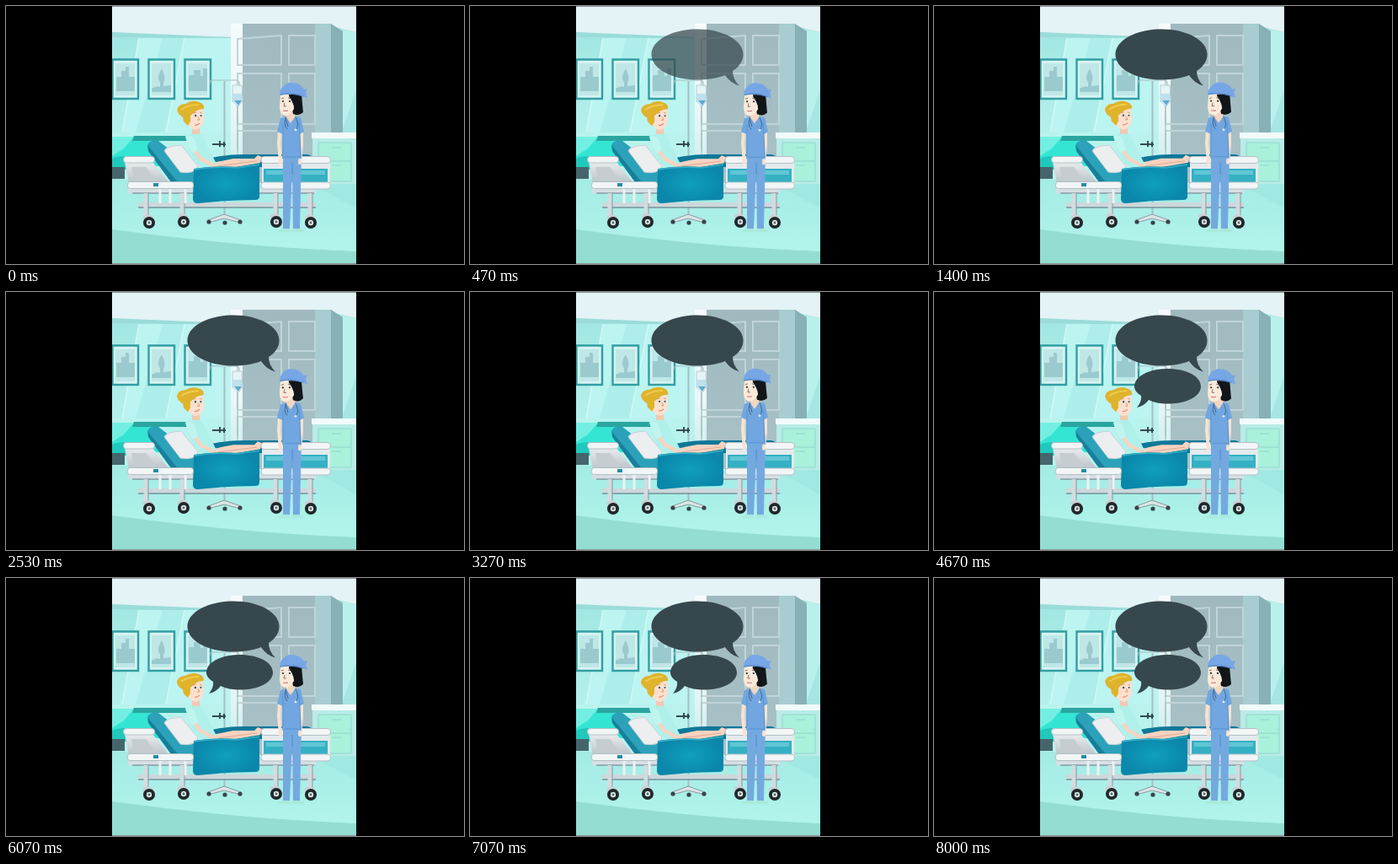
Write an HTML page that moves like this. It is 544x306 px and loops after 8.07 s.

```html
<!DOCTYPE html>
<html lang="en">
<head>
<meta charset="utf-8">
<title>Hospital talk</title>
<style>
html, body { margin: 0; width: 100%; height: 100%; overflow: hidden; background: #000; }
svg { display: block; width: 100vw; height: 100vh; }
</style>
</head>
<body>
<svg viewBox="0 0 544 306">
<defs>
  <clipPath id="view"><path d="M126 0H416V306H126Z"/></clipPath>
  <linearGradient id="wall" x2="0" y2="1"><stop stop-color="#a2e7e3"/><stop offset="1" stop-color="#bdf5f1"/></linearGradient>
  <linearGradient id="floor" x2="0" y2="1"><stop stop-color="#a3ebe4"/><stop offset="1" stop-color="#b4f6ec"/></linearGradient>
  <linearGradient id="door" x2="0" y2="1"><stop stop-color="#a0b9bf"/><stop offset="1" stop-color="#a9c2c8"/></linearGradient>
  <linearGradient id="jamb" x2="0" y2="1"><stop stop-color="#f5fbfc"/><stop offset=".55" stop-color="#eaf7f8"/><stop offset="1" stop-color="#c5eaec"/></linearGradient>
  <linearGradient id="rail" x2="0" y2="1"><stop stop-color="#e9ecee"/><stop offset="1" stop-color="#bcc4c8"/></linearGradient>
  <radialGradient id="quilt"><stop stop-color="#109fbd"/><stop offset="1" stop-color="#0a87aa"/></radialGradient>
  <g id="frame">
    <path d="M1.500 1.500H32V48H1.500Z" fill="#d6f3f2" stroke="#319fa3" stroke-width="2.4"/>
    <path d="M5 6H28V44H5Z" fill="#bfe7e7"/>
  </g>
  <g id="wheel">
    <path d="M-7-8Q0-12 5-7L3 4-6 2Z" fill="#c9d1d4"/>
    <circle r="7" fill="#20282b"/><circle r="3.200" fill="#dce5e8"/><circle r="1.400" fill="#58676e"/>
  </g>
</defs>
<g clip-path="url(#view)">
  <!-- room -->
  <path d="M126 0H416V306H126Z" fill="#e4f3f5"/>
  <path d="M126 31L270 37V214H126Z" fill="#9adcd9"/>
  <path d="M126 37L270 39V214H126Z" fill="url(#wall)"/>
  <path d="M158 38H268V150H138Z" fill="#bbf4f1"/>
  <path d="M186 38H212L190 150H154Z" fill="#adeeea"/>
  <path d="M158 38L138 150M212 38L190 150" stroke="#d4f8f5" stroke-width="1.500"/>
  <path d="M126 150H270V214H126Z" fill="#b9f3ee"/>
  <path d="M386 24L416 31V214H386Z" fill="#a5e6e3"/>
  <path d="M400 28L416 31V100L400 146Z" fill="#b9f0ec"/>
  <path d="M126 205L270 212 416 209V306H126Z" fill="url(#floor)"/>
  <path d="M126 265Q270 285 416 291V306H126Z" fill="#94ddd2"/>
  <path d="M368 214L416 210V240Z" fill="#a0e8e2"/>

  <!-- doorway -->
  <path d="M267 21H282V213H267Z" fill="url(#jamb)"/>
  <path d="M281 21H368V210H281Z" fill="url(#door)"/>
  <path d="M367 21H387V208H367Z" fill="#a8cdd1"/>
  <path d="M386 21L400 30V150H386Z" fill="#88b1b5"/>
  <path d="M275 39L327 35V70H275ZM336 35H367V70H336ZM275 80H327V140H275ZM336 80H367V140H336ZM275 148H327V190H275Z" fill="none" stroke="#c0d4d9" stroke-width="2"/>

  <!-- wall pictures -->
  <use href="#frame" x="125" y="62"/><use href="#frame" x="168" y="62"/><use href="#frame" x="211" y="62"/>
  <g fill="#9bcace">
    <path d="M131 101V84H137V77H142V72H146V84H153V101Z"/>
    <path d="M173 98Q180 94 183 96V90Q178 86 185 74 191 87 187 91V95L196 94V102H173Z"/>
    <path d="M217 101V82H223V76H231V83H234V74H239V101Z"/>
  </g>

  <!-- cabinet and sofa -->
  <path d="M364 156H416V211H364Z" fill="#b9ebe6"/>
  <path d="M363 150H416V157H363Z" fill="#f0fbfa"/>
  <path d="M371 162H410V208H371Z" fill="#aaf1dc" stroke="#8fd6cb"/>
  <path d="M371 184H410M387 168H398M387 189H398" stroke="#8fd6cb"/>
  <path d="M126 155H178L196 190H126Z" fill="#34e5d3"/>
  <path d="M126 155H152L140 169 126 178Z" fill="#72efe2"/>
  <path d="M152 154H214L219 160H150Z" fill="#2aa59f"/>
  <path d="M126 181Q142 174 170 184V194H126Z" fill="#1fc9bb"/>
  <path d="M126 191H141V205H126Z" fill="#45656d"/>

  <!-- drip stand -->
  <g fill="none" stroke="#a9bdc4">
    <path d="M259.500 89V249" stroke-width="2"/>
    <path d="M242 93Q242 87 247 88H273Q278 88 277 95M275 117V172" stroke-width="1.200"/>
  </g>
  <path d="M240 254L259 247 279 254V257L259 252 240 257Z" fill="#dbe4e7" stroke="#899ba2"/>
  <path d="M269 94H280L281 113 276 119 269 113Z" fill="#e6f3f7" stroke="#b6d0d8"/>
  <path d="M269 104H280L281 113H269Z" fill="#bfdfeb"/>
  <path d="M271 112H280L276 118Z" fill="#5ea9d0"/>
  <g fill="#37454b"><circle cx="241" cy="256" r="2.600"/><circle cx="260" cy="257" r="2.600"/><circle cx="278" cy="256" r="2.600"/></g>
  <path d="M245 164H261M254 160V167M259 161V167" stroke="#384b53" stroke-width="2"/>

  <!-- bed -->
  <path d="M238 182Q260 175 290 176H358Q366 177 369 191H238Z" fill="#0e7899"/>
  <path d="M168 165Q170 159 181 160L224 193V210H200Z" fill="#2ba2ba"/>
  <path d="M168 165L204 209H196L169 172Z" fill="#187f9b"/>
  <path d="M188 172Q190 166 208 165L228 190Q224 200 207 197Z" fill="#eceeef" stroke="#c8d2d7"/>
  <path d="M145 216H368V222H145Z" fill="#d6dfe3"/>
  <path d="M150 222H366" stroke="#859aa3" stroke-width="1.600"/>
  <path d="M157 233H368V238H157Z" fill="#cdd7db"/>
  <path d="M157 239H368" stroke="#798f99" stroke-width="1.300"/>
  <path d="M166 222V250M209 222V250M320 222V250M361 222V250" stroke="#d3dbde" stroke-width="5"/>
  <path d="M169 222V250M212 222V250M323 222V250M364 222V250" stroke="#91a4ad" stroke-width="1.200"/>
  <path d="M183 215V234M195 215V234M213 215V234" stroke="#edf2f4" stroke-width="3"/>
  <use href="#wheel" x="170" y="257"/><use href="#wheel" x="211" y="256"/>
  <use href="#wheel" x="321" y="256"/><use href="#wheel" x="362" y="257"/>

  <!-- patient -->
  <g id="patient">
    <path d="M240 187L270 181 295 181 299 177 304 179 302 186 279 190 240 195Z" fill="#f8d3bf"/>
    <path d="M250 190L298 184" stroke="#dfa996" fill="none"/>
    <path d="M221 143H230V157H221Z" fill="#f0c8b0"/>
    <path d="M213 154Q222 150 233 153L240 168 251 189Q240 196 230 190L220 177Z" fill="#b0f0ea"/>
    <path d="M222 168L231 181 250 191" fill="none" stroke="#f8d3bf" stroke-width="4.500" stroke-linecap="round"/>
    <path d="M213 155Q220 152 224 158L228 171 220 175Z" fill="#c0f5ef"/>
  </g>
  <path d="M223 193Q250 189 275 191L301 187 301 226Q301 230 296 230 262 230 228 234 222 234 222 229Z" fill="url(#quilt)"/>
  <path d="M223 194Q250 190 275 192L301 188" fill="none" stroke="#35aec6" stroke-width="1.500"/>
  <g id="patientHead">
    <path d="M215 124Q223 117 234 123L235 133Q234 145 226 147 217 146 214 134Z" fill="#fce0cd"/>
    <path d="M203 123Q205 116 213 116 221 111 229 114 236 116 235 122 229 122 225 125L219 130 219 137 216 142 211 137 210 132Q204 129 203 123Z" fill="#dfb32c"/>
    <path d="M208 123Q216 117 229 117" fill="none" stroke="#efcc52" stroke-width="1.800"/>
    <path d="M222 127L226 126M230 126L233 127M228 131L230 135 227 135" fill="none" stroke="#c78f68" stroke-width=".8"/>
    <path d="M224 141Q227 142 230 139" fill="none" stroke="#d07a76"/>
    <g fill="#29606f"><circle cx="225" cy="130" r="1.200"/><circle cx="231.500" cy="130" r="1.100"/></g>
  </g>

  <!-- bed rails -->
  <path d="M141 185H174L194 210H146Z" fill="url(#rail)"/>
  <path d="M149 191H166L179 207H152Z" fill="#c5cdd1"/>
  <path d="M304 184H385V212H304Z" fill="#e4eaed"/>
  <path d="M306 193H382V210H306Z" fill="#35b0c4"/>
  <path d="M309 195H379V200H309Z" fill="#5fc6d4"/>
  <g fill="#f2f5f6" stroke="#b3bfc5">
    <rect x="139.500" y="178.500" width="37" height="7.500" rx="3.500"/>
    <rect x="144.500" y="208.500" width="78" height="8" rx="3"/>
    <rect x="303" y="178.500" width="82.500" height="8" rx="3.500"/>
    <rect x="303" y="209" width="82.500" height="8" rx="3.500"/>
  </g>
  <path d="M175 210H181V214H175Z" fill="#258cab"/>

  <!-- nurse -->
  <path d="M329 174H351L349 264H341L340 196 337 264H329Z" fill="#74a9e0"/>
  <path d="M340 186V200" stroke="#518ac6"/>
  <path d="M323 268Q325 264 330 264H337V268ZM338 268Q340 264 342 264H350Q355 265 355 268Z" fill="#a9eadb"/>
  <g id="nurse">
    <path d="M325 148L324 163 326 186M351 148L351 165 349 186" fill="none" stroke="#f8e2d0" stroke-width="4" stroke-linecap="round"/>
    <path d="M326 133Q338 129 350 132L354 149 349 152 351 181H328L329 152 322 149Z" fill="#71a6e0"/>
    <path d="M348 139L349 153 350 178M329 140V176M331 179H350" fill="none" stroke="#5a94d2"/>
    <path d="M333 124H343V132L338 139 333 132Z" fill="#f3d6bf"/>
    <path d="M332 132L335 143M344 132Q349 141 344 147M333 132Q329 140 334 146" fill="none" stroke="#42668f"/>
    <circle cx="344" cy="147" r="1.400" fill="#dcebf4"/>
  </g>
  <g id="nurseHead">
    <path d="M336 104H351Q352 117 353 126 348 131 341 128Z" fill="#12161b"/>
    <path d="M326 106Q336 101 343 106L342 122Q338 130 331 130 325 128 325 120Z" fill="#fbead9"/>
    <path d="M336 105Q348 103 350 111L352 126Q346 131 342 127 344 118 336 107Z" fill="#12161b"/>
    <path d="M325 106Q325 95 336 91 349 90 354 99L358 98 356 103 358 109 352 107Q338 103 325 106Z" fill="#76a6e6"/>
    <path d="M326 105Q340 102 353 107" fill="none" stroke="#5688cb" stroke-width="1.200"/>
    <path d="M327 110L330 109M335 109L339 110M331 115L330 119 333 119" fill="none" stroke="#6e5148" stroke-width=".8"/>
    <path d="M329 124Q332 125 335 124" fill="none" stroke="#cf7a7c"/>
    <g fill="#1e2b36"><circle cx="329" cy="113" r="1.100"/><circle cx="337" cy="113" r="1.100"/></g>
  </g>

  <!-- speech -->
  <path id="ask" fill="#37474e" d="M215.500 57.500C215.500 41 239 27.500 270 27.500S324.500 41 324.500 57.500C324.500 65 320 72 312 77Q312 87 320 94.500 309 91.500 303 82C293 86 281 87.500 270 87.500C239 87.500 215.500 74 215.500 57.500Z"/>
  <path id="reply" fill="#37474e" d="M238 112C238 100 255 91 277.500 91S317 100 317 112 300 132.500 277.500 132.500C269 132.500 261 131 255 128Q250 135 241 137 247 130 246 123C241 120 238 116 238 112Z"/>
  <path d="M126 .5H416M126 305.500H416" stroke="#8b9698"/>
</g>
</svg>
<script>
const LOOP = 8070, FADE = 500;
const part = id => document.getElementById(id);
const ask = part('ask'), reply = part('reply');
const nurse = part('nurse'), nurseHead = part('nurseHead');
const patient = part('patient'), patientHead = part('patientHead');
const fade = (t, start) => Math.max(0, Math.min(1, (t - start) / FADE));
const wave = (t, cycles, phase = 0) => Math.sin(2 * Math.PI * (t / LOOP * cycles + phase));
const shift = (el, y, turn = 0, pivot = '0 0') =>
  el.setAttribute('transform', `translate(0 ${y}) rotate(${turn} ${pivot})`);

function draw() {
  const t = performance.now() % LOOP;
  ask.setAttribute('opacity', fade(t, 110));
  reply.setAttribute('opacity', fade(t, 3690));
  // Quiet breathing
  const breath = .35 * wave(t, 4);
  shift(nurse, breath);
  shift(nurseHead, breath, .5 * wave(t, 2), '338 130');
  shift(patient, breath * .4);
  shift(patientHead, breath * .7, .4 * wave(t, 2, .25), '225 147');
  requestAnimationFrame(draw);
}
draw();
</script>
</body>
</html>
```
